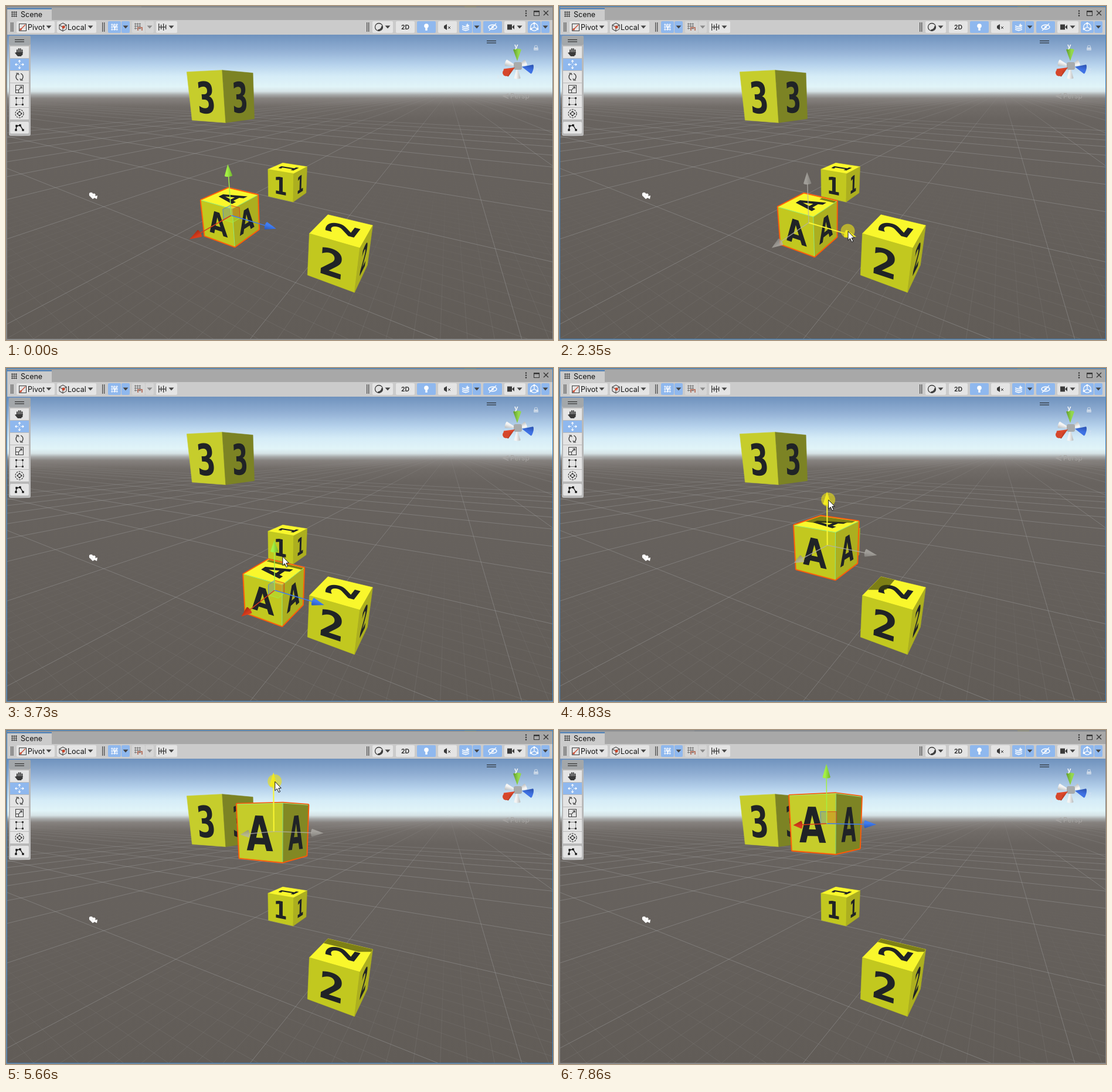
An HTML page with a canvas for the animation above (8300 ms loop, 933 by 571 pixels).

```html
<!DOCTYPE html>
<html lang="en">
<head>
<meta charset="utf-8">
<title>Moving a cube in the scene view</title>
<style>
html, body { margin: 0; width: 100%; height: 100%; overflow: hidden; background: #635e5a; }
canvas { display: block; }
</style>
</head>
<body>
<canvas id="stage" width="933" height="571"></canvas>
<script>
const g = document.getElementById('stage').getContext('2d');
const LOOP = 8300;

// ---------- drawing helpers ----------
function rect(x, y, w, h, color, r = 0) {
  g.fillStyle = color;
  g.beginPath();
  g.roundRect(x, y, w, h, r);
  g.fill();
}
function trace(pts, close) {
  g.beginPath();
  pts.forEach(([x, y]) => g.lineTo(x, y));
  if (close) g.closePath();
}
function fill(pts, color) {
  trace(pts, true);
  g.fillStyle = color;
  g.fill();
}
function line(pts, color, width = 1, close = false) {
  trace(pts, close);
  g.strokeStyle = color;
  g.lineWidth = width;
  g.stroke();
}
function box(x, y, size, color, h = size) {
  g.strokeStyle = color;
  g.lineWidth = 1;
  g.strokeRect(x + .5, y + .5, size, h);
}
function arc(x, y, r, color, width = 1.2, from = 0, to = 7) {
  g.beginPath();
  g.arc(x, y, r, from, to);
  g.strokeStyle = color;
  g.lineWidth = width;
  g.stroke();
}
function disc(x, y, r, color) {
  g.beginPath();
  g.arc(x, y, r, 0, 7);
  g.fillStyle = color;
  g.fill();
}
function text(str, x, y, size, color, weight = '') {
  g.font = `${weight} ${size}px Inter, sans-serif`;
  g.fillStyle = color;
  g.fillText(str, x, y);
}
// Runs a drawing n times, turned evenly about a centre
function turned(x, y, n, paint) {
  for (let k = 0; k < n; k++) {
    g.save();
    g.translate(x, y);
    g.rotate(k * 2 * Math.PI / n);
    paint();
    g.restore();
  }
}
function vertical(y0, y1, stops) {
  const grad = g.createLinearGradient(0, y0, 0, y1);
  stops.forEach(([y, c]) => grad.addColorStop((y - y0) / (y1 - y0), c));
  return grad;
}
const mix = (a, b, f) => a.map((v, i) => v + (b[i] - v) * f);
const clamp = f => Math.max(0, Math.min(1, f));
const easeOut = (t, t0, t1, power) => 1 - (1 - clamp((t - t0) / (t1 - t0))) ** power;

// ---------- camera: 60 degree view, pitched 20 degrees ----------
const EYE = [4.69, 3.05, 4.29];
const LIGHT = [-.44, -1, .727];
const add = (p, q, k = 1) => p.map((v, i) => v + q[i] * k);
function view(p) {
  const [x, y, z] = add(p, EYE, -1);
  return [-.5165 * x + .8563 * z,
          .2929 * x - .9397 * y + .1767 * z,
          -.8046 * x - .342 * y - .4854 * z];
}
function project(p) {
  const [x, y, z] = view(p);
  return [466 + 451 * x / z, 310 + 451 * y / z];
}
const cross = (o, a, b) => (a[0] - o[0]) * (b[1] - o[1]) - (a[1] - o[1]) * (b[0] - o[0]);
function hull(points) {
  const pts = [...points].sort((a, b) => a[0] - b[0] || a[1] - b[1]);
  const half = list => {
    const h = [];
    for (const p of list) {
      while (h.length > 1 && cross(h.at(-2), h.at(-1), p) <= 0) h.pop();
      h.push(p);
    }
    return h.slice(0, -1);
  };
  return [...half(pts), ...half(pts.reverse())];
}

// ---------- cubes ----------
const SIGNS = [-.5, .5];
const corners = c => SIGNS.flatMap(x => SIGNS.flatMap(y => SIGNS.map(z => add(c, [x, y, z]))));
const X = [1, 0, 0], Y = [0, 1, 0], Z = [0, 0, 1], BACK_X = [-1, 0, 0], BACK_Z = [0, 0, -1];

function drawFace(c, [n, u, v], color, label, casters = []) {
  const mid = add(c, n, .5);
  const at = (a, b) => project(add(add(mid, u, a), v, b));
  const quad = [at(-.5, -.5), at(.5, -.5), at(.5, .5), at(-.5, .5)];
  if (cross(quad[0], quad[1], quad[2]) > -1) return;
  fill(quad, color);
  line(quad, color, .6, true);
  g.save();
  const side = add(at(.3, 0), at(-.3, 0), -1), down = add(at(0, -.3), at(0, .3), -1);
  g.transform(...[...side, ...down].map(d => d / 60), ...at(0, 0));
  g.font = 'bold semi-condensed 86px "DejaVu Sans", sans-serif';
  g.textAlign = 'center';
  g.fillStyle = '#202326';
  g.fillText(label, 0, 32);
  g.restore();
  g.save();
  trace(quad, true);
  g.clip();
  for (const cube of casters) {
    const spots = corners(cube).map(([x, y, z]) => {
      const top = Math.max(y, mid[1]);
      return project(add([x, top, z], LIGHT, top - mid[1]));
    });
    fill(hull(spots), 'rgba(62,66,10,.66)');
  }
  g.restore();
}
function drawCube(c, label, casters = []) {
  const low = clamp((project(c)[1] - 150) / 150);
  const shade = (a, b) => `rgb(${mix(a, b, low).map(Math.round)})`;
  drawFace(c, [Y, BACK_X, BACK_Z], '#f9f72c', label, casters.filter(p => p[1] > c[1]));
  drawFace(c, [X, Z, Y], shade([198, 205, 44], [194, 200, 31]), label);
  drawFace(c, [Z, BACK_X, Y], shade([122, 129, 36], [172, 175, 31]), label);
}
function drawOutline(c) {
  g.lineJoin = 'round';
  line(hull(corners(c).map(project)), '#ff5a0a', 4.4, true);
  g.lineJoin = 'miter';
}
function drawCollider(c) {
  const front = project(add(c, [.5, .5, .5]));
  for (const axis of [X, Y, Z]) line([front, project(add(add(c, [.5, .5, .5]), axis, -1))], 'rgba(140,250,150,.8)');
}

// ---------- transform handles ----------
const AXES = [
  { dir: X, color: '#db3c1c', dark: '#a82b12' },
  { dir: Z, color: '#3f7cf2', dark: '#2857b8' },
  { dir: Y, color: '#a4f045', dark: '#6fb52c' },
];
function drawCone(tip, base, r, color, dark) {
  const [dx, dy] = add(tip, base, -1);
  g.save();
  g.translate(...base);
  g.rotate(Math.atan2(dy, dx));
  const grad = g.createLinearGradient(0, -r, 0, r);
  grad.addColorStop(.35, color);
  grad.addColorStop(1, dark);
  g.fillStyle = grad;
  g.beginPath();
  g.ellipse(0, 0, r * .3, r, 0, Math.PI / 2, Math.PI * 1.5);
  g.lineTo(Math.hypot(dx, dy), 0);
  g.fill();
  g.restore();
}
// A point on an axis handle, which keeps its size on screen
const onHandle = (c, dir, part) => project(add(c, dir, view(c)[2] * .2 * part));

function drawHandles(c, active, dragging) {
  if (!dragging) {
    const q = view(c)[2] * .042;
    for (const axis of AXES) {
      const [a, b] = AXES.filter(s => s !== axis).map(s => s.dir);
      const quad = [c, add(c, a, q), add(add(c, a, q), b, q), add(c, b, q)].map(project);
      g.globalAlpha = .25;
      fill(quad, axis.color);
      g.globalAlpha = .8;
      line(quad, axis.color, 1, true);
    }
  }
  for (const { dir, color, dark } of AXES) {
    const on = dir === active, mute = dragging && !on;
    const tint = on ? '#fbf632' : mute ? '#b4b2ac' : color;
    const base = onHandle(c, dir, .79);
    g.globalAlpha = mute ? .75 : 1;
    line([project(c), base], tint, on ? 2 : 1.5);
    drawCone(onHandle(c, dir, 1), base, 6.7, tint, on ? '#e0d920' : mute ? '#8d8b86' : dark);
  }
  g.globalAlpha = 1;
}

// ---------- ground and sky ----------
function drawWorld() {
  rect(0, 49, 933, 522, vertical(49, 571, [
    [49, '#6f92bd'], [75, '#90aed3'], [100, '#b6d2ec'], [120, '#d5ecf7'], [138, '#e1f4f8'],
    [146, '#d6e3e6'], [152, '#a6a8a8'], [158, '#86827f'], [172, '#716c68'], [195, '#68635f'], [571, '#615c57']]));
  const gray = a => `rgba(158,158,158,${a})`;
  const major = vertical(146, 571, [[146, gray(0)], [158, gray(.1)], [230, gray(.42)], [571, gray(.48)]]);
  const minor = vertical(146, 571, [[146, gray(0)], [290, gray(0)], [571, gray(.18)]]);
  for (let i = -90; i <= 90; i++) {
    const style = i % 10 ? minor : major;
    const a = -.802 + .1094 * i, b = 2.52 + .181 * i;
    line([[756, 146], [756 + 425 * a, 571]], style);
    if (b > 0) line([[-330, 146], [-330 + 425 * b, 571]], style);
  }
  // camera marker
  disc(145, 322, 3.2, '#fff');
  disc(150, 323, 2.6, '#fff');
  fill([[142, 324], [152, 325], [156, 324], [155, 330], [151, 328], [148, 330]], '#fff');
}
function drawOrientation() {
  for (const y of [59, 62.5]) rect(820, y, 16, 1.2, '#2b3136');
  for (const [x, y] of [[853, 97], [886, 97], [872, 123]]) drawCone([872, 103], [x, y], 5.5, '#f4f4f4', '#b9bcbd');
  rect(866, 96, 14, 13, '#a8abac', 3);
  drawCone([872, 94], [872, 75], 6.8, '#93d84e', '#5f9b2a');
  drawCone([880, 104], [897, 108], 8, '#3f72e4', '#2a50ad');
  drawCone([868, 105], [853, 114], 7.5, '#e2492c', '#a93019');
  disc(853, 114, 6, '#d5472c');
  text('y', 867, 72, 11, '#f4f6f7', 'bold');
  text('x', 837, 124, 10, 'rgba(235,225,225,.4)');
  text('z', 903, 113, 10, 'rgba(225,230,245,.5)');
  rect(900, 71, 8, 5, 'rgba(230,235,240,.6)', 1);
  arc(904, 70, 2.5, 'rgba(230,235,240,.6)');
  line([[857, 150], [848, 154], [857, 158]], '#a9a7a5', 1.3);
  line([[848, 154], [857, 154]], '#a9a7a5');
  text('Persp', 860, 158, 12, '#a9a7a5');
}

// ---------- window chrome ----------
const INK = '#3a3a3a', PLAIN = '#e4e4e4', BLUE = '#8fb8ee', OFF = '#d6d6d6';
const arrow = (x, color = '#444') => fill([[x - 4.5, 33.5], [x + 4.5, 33.5], [x, 38.5]], color);
const button = (x, w, color = PLAIN) => rect(x, 26, w, 20, color, 2);
const grip = x => [0, 3].forEach(d => rect(x + d, 28, 1.4, 16, '#555'));
// A button with a drop-down half beside it
function split(x, color, ink) {
  button(x, 22, color);
  button(x + 23, 14, color);
  arrow(x + 30, ink);
}
function grid(x, y, color, s = 12) {
  for (const k of [.15, .5, .85]) {
    line([[x + s * k, y], [x + s * k, y + s]], color);
    line([[x, y + s * k], [x + s, y + s * k]], color);
  }
}
function drawTabs(focused) {
  rect(0, 0, 933, 25, '#a8a8a8');
  rect(0, 0, 933, 1.5, '#5f7fa3');
  if (!focused) rect(0, 0, 231, 1.5, '#c8c8c8');
  rect(782, 0, 20, 1.5, '#c9c532');
  rect(0, 1.5, 933, 1, '#858585');
  rect(2, 3, 76, 22, '#cbcbcb');
  rect(2, 3.5, 76, 2, '#3a72b0');
  grid(9, 9, '#444', 10);
  text('Scene', 25, 19, 12.5, '#111');
  for (const y of [8.5, 12.5, 16.5]) disc(887, y, 1.2, '#333');
  box(900, 8, 9, '#333', 8);
  rect(900, 8, 10, 2.5, '#333');
  line([[917, 8], [925, 16]], '#333', 1.3);
  line([[925, 8], [917, 16]], '#333', 1.3);
}
function drawToolbar() {
  rect(0, 24, 933, 25, '#cbcbcb');
  [8, 164, 615].forEach(grip);
  button(18, 65);
  box(22, 30, 12, INK);
  line([[24, 41], [33, 32]], '#c8452b', 1.2);
  disc(25, 40, 1.8, '#c8452b');
  text('Pivot', 37, 40.5, 12.5, '#111');
  arrow(73);
  button(87, 67);
  turned(97, 36, 3, () => line([[0, 0], [0, 7], [6, 3.5], [6, -3.5]], INK));
  disc(98, 36, 2.5, '#c8452b');
  text('Local', 105, 40.5, 12.5, '#111');
  arrow(144);
  split(174, BLUE);
  grid(179, 30, '#f4f8ff');
  text('Y', 182, 41, 10, '#fff', 'bold');
  split(215, OFF, '#8a8a8a');
  grid(219, 29, '#777', 11);
  line([[225, 42], [225, 37], [232, 37], [232, 42]], '#b77a69', 2);
  button(256, 36);
  for (let i = 0; i < 4; i++) rect(260 + 4 * i, 30 + i % 2 * 2, 1.3, 12 - i % 2 * 4, INK);
  rect(260, 35.4, 13, 1.3, INK);
  arrow(282);

  button(625, 35);
  arc(636, 36, 6.5, INK, 1.3);
  arc(634.5, 34.5, 7, INK, 2.6, 0, 1.6);
  arrow(651);
  button(665, 32);
  text('2D', 674, 40, 10.5, '#222', '600');
  button(701, 32, BLUE);
  disc(717, 34, 3.8, '#fff');
  rect(715.3, 36, 3.4, 6, '#fff');
  button(737, 32);
  fill([[747, 34], [752, 31], [752, 41], [747, 38]], INK);
  turned(756, 37, 4, () => line([[0, 0], [2, 2]], INK));
  split(773, BLUE);
  for (const y of [35, 38, 41]) line([[778, y - 1], [784, y + 1], [790, y - 1]], '#fff', 1.4);
  turned(787, 33, 4, () => fill([[-1.3, 1.3], [0, -4], [1.3, 1.3]], '#fff'));
  button(814, 32, BLUE);
  g.beginPath();
  g.ellipse(830, 36, 7, 3.8, 0, 0, 7);
  g.strokeStyle = '#fff';
  g.stroke();
  disc(830, 36, 2, '#fff');
  line([[824, 42], [836, 30]], '#fff', 1.3);
  button(850, 36);
  rect(855, 31.5, 8, 9, INK);
  fill([[863, 36], [867, 32], [867, 40]], INK);
  arrow(876);
  split(890, BLUE);
  arc(901, 36, 6.3, '#fff');
  turned(901, 36, 3, () => { line([[0, 0], [0, -6]], '#fff', 1.2); disc(0, -6.5, 1.8, '#fff'); });
}
function arrows(x, y, r, color) {
  turned(x, y, 4, () => {
    line([[0, 2], [0, r]], color);
    fill([[-2.5, r - 2], [2.5, r - 2], [0, r + 1]], color);
  });
}
function drawTools() {
  rect(5, 51, 37, 171, '#b9b9b9', 3);
  rect(5, 51, 37, 16, '#a3a7aa', 3);
  for (const y of [57, 60.5]) rect(15, y, 16, 1.2, '#333');
  for (let i = 0; i < 6; i++) rect(7, 69 + 21 * i, 32, 20, i === 1 ? BLUE : PLAIN);
  rect(7, 198, 32, 20, PLAIN, 2);
  for (let i = 0; i < 4; i++) rect(18 + 2.8 * i, 72 + (i - 1.5) ** 2, 2, 10, INK, 1);
  fill([[18, 79], [29, 79], [26, 86], [20, 86], [15, 80]], INK);
  arrows(23, 100, 7, '#fff');
  turned(23, 121, 2, () => {
    arc(0, 0, 6, INK, 1.4, -1.2, 1.1);
    line([[1, 3], [2, 6], [6, 6]], INK, 1.2);
  });
  box(16, 135, 13, INK);
  box(16, 143, 5, INK);
  line([[22, 143], [27, 138]], INK, 1.2);
  line([[23.5, 138], [27, 138], [27, 141.5]], INK, 1.2);
  box(17, 157, 11, '#888');
  for (const x of [16, 27]) for (const y of [156, 167]) rect(x, y, 3, 3, INK);
  g.setLineDash([3, 1.5]);
  arc(23, 184, 7, INK);
  g.setLineDash([]);
  arrows(23, 184, 4, INK);
  const path = [[17, 212], [18, 205], [24, 204], [29, 212]];
  line(path, '#111', 1.4);
  for (const [x, y] of path) rect(x - 1.7, y - 1.7, 3.4, 3.4, '#111');
}

// ---------- timeline ----------
const FIXED = { 1: [-3.09, .03, -.05], 2: [-.08, -.114, 2.915], 3: [-.036, 2.937, -.052] };
const cubeAt = t => [0, 2.895 * easeOut(t, 4430, 5860, 1.5), 1.335 * easeOut(t, 2060, 2790, 1.75)];
const grab = (t, dir) => add(onHandle(cubeAt(t), dir, .81), [2, -5]);

// Free pointer moves: start, end, from, to
const REST = [419, 399], LEAVE = [652, 531];
const MOVES = [
  [160, 960, [567, 566], REST],
  [1000, 1850, REST, grab(0, Z)],
  [3110, 3860, grab(3000, Z), grab(3000, Y)],
  [6300, 7130, grab(LOOP, Y), LEAVE],
  [7250, 7420, LEAVE, [648, 571]],
];
function pointerAt(t) {
  if (t >= 1850 && t < 3110) return grab(t, Z);
  if (t >= 3860 && t < 6300) return grab(t, Y);
  const [start, end, from, to] = MOVES.findLast(m => t >= m[0]);
  return mix(from, to, clamp((t - start) / (end - start)));
}
function drawPointer(t, pressed) {
  if (t < 160 || t >= 7420) return;
  const [x, y] = pointerAt(t);
  if (pressed) disc(x, y, 12, 'rgba(236,226,22,.62)');
  g.save();
  g.translate(x, y);
  const shape = [[.5, .5], [.5, 16], [4, 12.7], [6.8, 18.8], [9.3, 17.7], [6.6, 11.8], [11, 11.6]];
  fill(shape, '#fff');
  line(shape, '#111', 1, true);
  g.restore();
}

function draw(t) {
  const cube = cubeAt(t);
  const pressed = t >= 1890 && t < 2990 || t >= 4220 && t < 6300;
  const active = t >= 1650 && t < 2990 ? Z : t >= 3800 && t < 6300 ? Y : null;
  const focused = t >= 1890 && t < 7860;

  drawWorld();
  drawCube(FIXED[3], '3');
  drawCube(FIXED[1], '1');
  drawCube(FIXED[2], '2', [cube]);
  drawOutline(cube);
  drawCube(cube, 'A', [FIXED[3]]);
  drawCollider(cube);
  drawHandles(cube, active, pressed);
  drawOrientation();
  drawTabs(focused);
  drawToolbar();
  drawTools();
  rect(0, 0, 1, 571, '#8c8c8c');
  rect(0, 570, 933, 1, '#8c8c8c');
  box(1, 0, 931, focused ? '#3c84c6' : '#858585', 569);
  drawPointer(t, pressed);
}

const start = performance.now();
function frame() {
  draw((performance.now() - start) % LOOP);
  requestAnimationFrame(frame);
}
frame();
</script>
</body>
</html>
```
